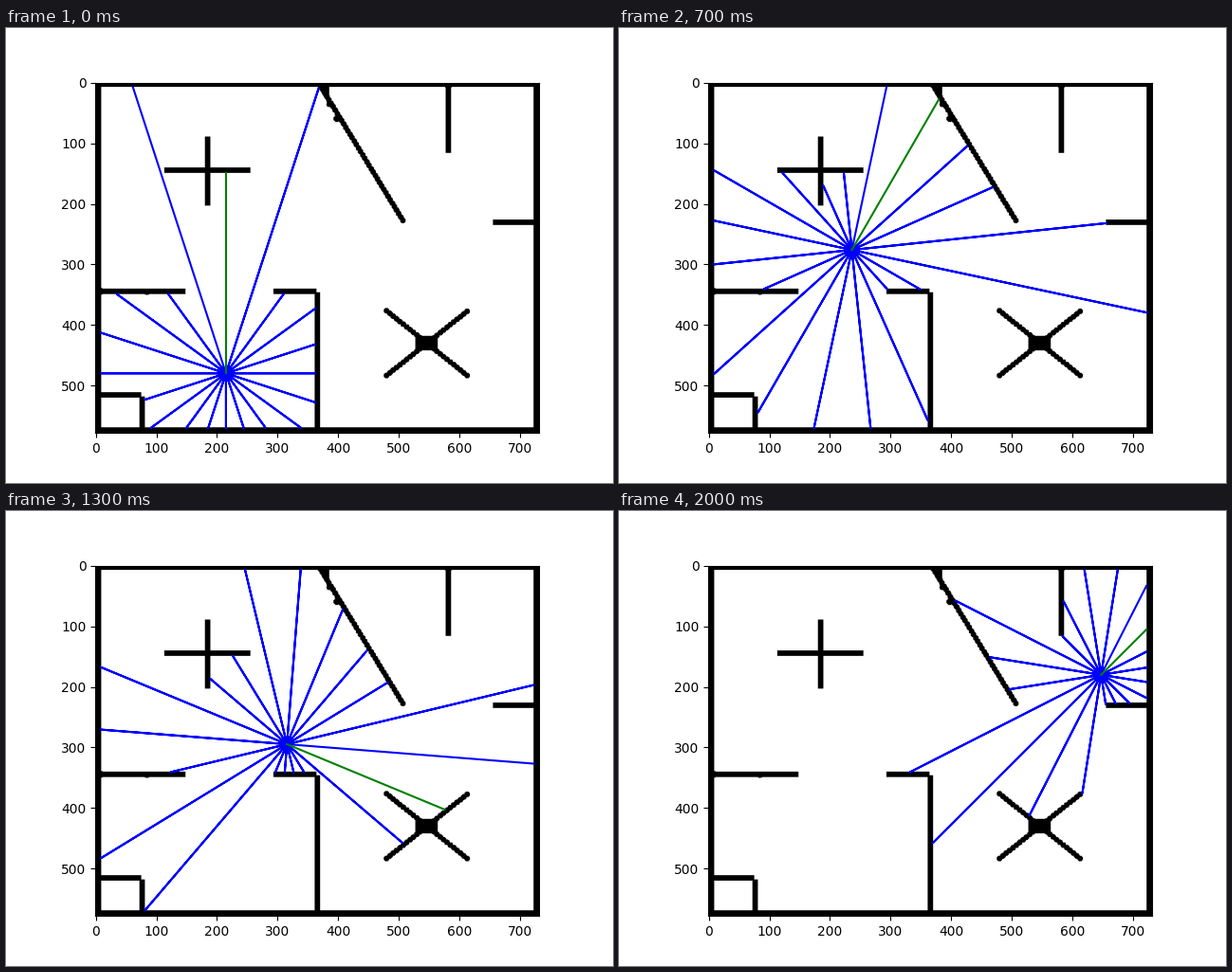
A matplotlib script that plays this animation: 640x480 px, repeating every 2.1 s.

```python
import numpy as np
import matplotlib.pyplot as plt
from matplotlib.animation import FuncAnimation

W, H = 732, 579
RAYS = 20
REACH = 500

yy, xx = np.mgrid[0:H, 0:W]
wall = np.zeros((H, W), bool)


def rect(x0, y0, x1, y1):
    wall[y0:y1 + 1, x0:x1 + 1] = True


def disc(x, y, r):
    wall[(xx - x) ** 2 + (yy - y) ** 2 <= r * r] = True


def beads(p, q, n, r=4.7):
    for x, y in zip(np.linspace(p[0], q[0], n), np.linspace(p[1], q[1], n)):
        disc(x, y, r)


def build_map():
    # outer walls
    rect(0, 0, 9, H - 1)
    rect(723, 0, W - 1, H - 1)
    rect(0, 0, W - 1, 7)
    rect(0, 570, W - 1, H - 1)
    # lower-left room with its small closet
    rect(0, 341, 148, 349)
    rect(294, 341, 364, 349)
    rect(362, 347, 370, H - 1)
    rect(0, 512, 75, 520)
    rect(73, 519, 81, H - 1)
    # plus sign
    rect(114, 141, 255, 149)
    rect(181, 90, 189, 203)
    # stubs on the right
    rect(578, 0, 586, 116)
    rect(656, 227, W - 1, 235)
    # slanted wall with its filled corner
    beads((371, 6), (507, 228), 40)
    wall[(xx >= 366) & (xx <= 385) & (yy <= 32) & (yy - 6 <= 1.6 * (xx - 366))] = True
    disc(386, 36, 5)
    disc(398, 60, 5.5)
    # diagonal cross with a solid hub
    beads((480, 377), (613, 484), 25)
    beads((613, 378), (480, 484), 25)
    rect(528, 419, 564, 442)
    # rounded joints
    for x, y, r in [(582, 5, 6), (185, 145, 6), (726, 231, 6), (8, 345, 6), (85, 346, 5)]:
        disc(x, y, r)


def build_path():
    """Poses (x, y, heading in degrees): up, around a bend, across, up to the corner."""
    poses = [(215, 480 - 30 * i, 90) for i in range(7)]
    poses.append((236.3, 276, 60))
    for turn in (30, 0, -22.5, -45, -67.5):
        a = np.radians(turn + 90)
        poses.append((272 + 41.5 * np.cos(a), 294.2 - 41.5 * np.sin(a), turn))
    poses += [(315.7, 294.7, -22.5), (352, 308, 0), (396, 314, 22.5), (442, 311, 45)]
    poses += [(488 + 53.3 * i, 300 - 40 * i, 45) for i in range(4)]
    return poses


def cast(x, y, angle):
    dx, dy = np.cos(angle), np.sin(angle)
    for d in range(1, REACH + 1):
        px, py = x + d * dx, y + d * dy
        if wall[int(round(py)), int(round(px))]:
            break
    return px, py


build_map()
poses = build_path()

fig, ax = plt.subplots(figsize=(6.4, 4.8), dpi=100)
ax.imshow(np.where(wall, 0, 255), cmap="gray", vmin=0, vmax=255)
ax.autoscale(False)
scan, = ax.plot([], [], "b")
front, = ax.plot([], [], "g")


def update(i):
    x, y, heading = poses[i]
    angles = np.radians(-heading + 360 / RAYS * np.arange(RAYS))
    hits = [cast(x, y, a) for a in angles]
    # one out-and-back stroke through all side rays
    pts = [p for hit in hits[1:] for p in ((x, y), hit)]
    scan.set_data(*zip(*pts))
    front.set_data(*zip((x, y), hits[0]))
    return scan, front


anim = FuncAnimation(fig, update, frames=len(poses), interval=100, repeat=True)
plt.show()
```
